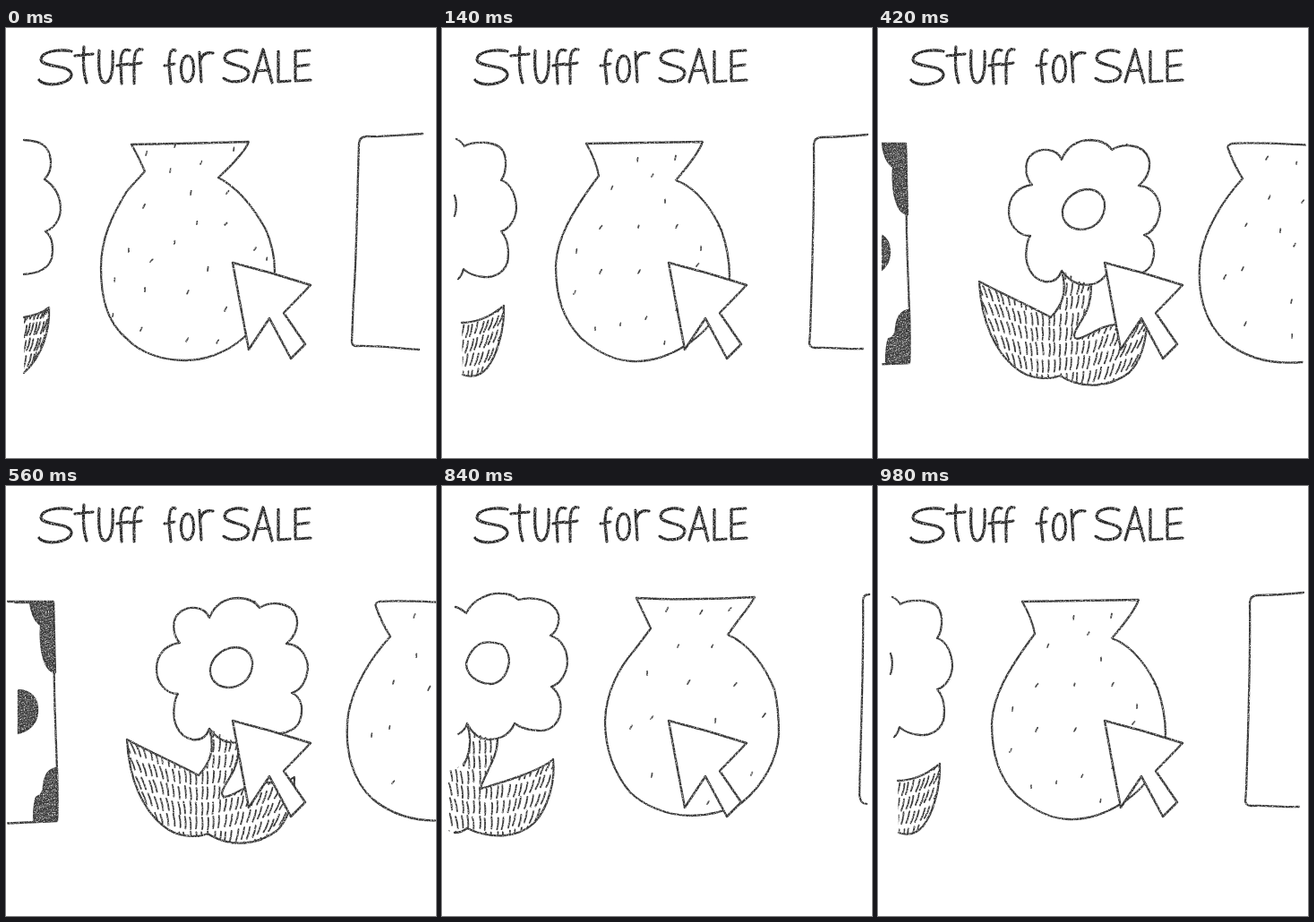
An HTML page that plays this animation: 480 px wide and 480 px high, repeating every 1120 ms.

```html
<!DOCTYPE html>
<html lang="en">
<head>
<meta charset="utf-8">
<title>Stuff for sale</title>
<style>
html, body { margin: 0; width: 100%; height: 100%; overflow: hidden; background: #fff; }
svg { display: block; width: 100vw; height: 100vh; }
path { fill: none; stroke: #383838; stroke-width: 2.3; stroke-linecap: round; stroke-linejoin: round; }
.ink { filter: url(#pencil); }
.title path { stroke: #262626; stroke-width: 3.2; }
.dots { stroke: #444; stroke-width: 1.8; }
.hatch { stroke: #3a3a3a; }
.dark { fill: #555; }
.white { fill: #fff; stroke: none; }
.arrow { stroke-width: 2.5; }
/* the row slides out and back: five poses over eight equal holds */
.pose { opacity: 0; animation: 1120ms step-end infinite; }
.pose0 { animation-name: pose0; }
.pose1 { animation-name: pose1; }
.pose2 { animation-name: pose2; }
.pose3 { animation-name: pose3; }
.pose4 { animation-name: pose4; }
@keyframes pose0 { 0% { opacity: 1 } 12.5%, 100% { opacity: 0 } }
@keyframes pose1 { 0%, 25% { opacity: 0 } 12.5%, 87.5%, 100% { opacity: 1 } }
@keyframes pose2 { 0%, 37.5%, 87.5%, 100% { opacity: 0 } 25%, 75% { opacity: 1 } }
@keyframes pose3 { 0%, 50%, 75%, 100% { opacity: 0 } 37.5%, 62.5% { opacity: 1 } }
@keyframes pose4 { 0%, 62.5%, 100% { opacity: 0 } 50% { opacity: 1 } }
</style>
</head>
<body>
<svg viewBox="0 0 480 480">
  <defs>
    <filter id="pencil" filterUnits="userSpaceOnUse" x="0" y="0" width="480" height="480" color-interpolation-filters="sRGB">
      <feTurbulence type="fractalNoise" baseFrequency=".08" numOctaves="2" result="wobble"/>
      <feDisplacementMap in="SourceGraphic" in2="wobble" scale="1.4" xChannelSelector="R" yChannelSelector="G" result="line"/>
      <feTurbulence type="fractalNoise" baseFrequency=".7" numOctaves="2" seed="4"/>
      <feColorMatrix values="0 0 0 0 0  0 0 0 0 0  0 0 0 0 0  2.4 0 0 0 -.25" result="grain"/>
      <feComposite in="line" in2="grain" operator="in"/>
      <feGaussianBlur stdDeviation=".4"/>
    </filter>
  </defs>

  <g class="title ink" role="img" aria-label="Stuff for SALE">
    <path d="M73 26C60 23 40 26 39 35C40 45 72 40 73 52C72 64 42 66 37 58"/>
    <path d="M87 21C86 35 86 50 90 61M77 31L97 29"/>
    <path d="M104 25C103 45 104 61 111 61C118 60 120 45 119 26"/>
    <path d="M138 25C130 22 128 30 128 40L129 62M124 42L137 40"/>
    <path d="M152 24C144 22 143 32 143 42L143 62M138 41L151 39"/>
    <path d="M189 25C183 22 182 32 182 42L184 62M177 42L188 40"/>
    <path d="M203 31C193 31 193 60 202 60C212 60 212 32 203 31Z"/>
    <path d="M216 27L218 60M217 36Q220 26 231 28"/>
    <path d="M269 27C260 23 245 25 244 34C245 43 271 40 271 51C268 63 247 61 243 56"/>
    <path d="M276 60L287 24L297 61M279 48L294 47"/>
    <path d="M304 26L304 60L317 59"/>
    <path d="M339 25L323 26L323 59L340 58M323 43L338 41"/>
  </g>

  <g id="row"></g>

  <path class="white" d="M253 262L340 287L310 318L334 353L318 369L294 324L271 359Z"/>
  <path class="arrow ink" d="M253 262Q297 273 340 287L310 318L334 353L318 369L294 324L271 359Q262 312 253 262Z"/>
</svg>

<script>
const poses = [
  {
    lines: `M140 130Q205 129 271 127Q266 140 237 167C262 180 279 205 290 225Q300 248 300 272
      C300 300 288 330 266 345C245 364 220 371 200 371C175 371 150 363 135 347C112 328 106 300 106 268
      C106 235 118 210 135 182L155 160Q147 142 140 130
      M20 125C38 126 48 130 50 148Q51 160 43 169C57 178 61 192 61 203C60 215 53 224 44 227
      C52 233 53 245 51 257C47 270 35 274 20 275
      M465 118C445 119 415 122 402 121Q394 122 394 129C392 190 391 270 388 300L386 350Q386 355 391 355
      C415 354 440 358 461 359`,
    leaf: "M20 323Q38 320 48 312C49 335 42 365 20 385",
    hatch: { x: 20, w: 30, cx: -20, gap: 3.6, width: 2 },
    dots: "157,140 189,131 184,159 218,150 255,135 207,184 247,183 154,199 214,217 245,218 189,239 138,248 162,259 226,269 278,246 122,281 156,292 203,295 120,320 245,314 151,336 202,348 236,350 292,257"
  },
  {
    lines: `M161 129Q225 128 291 127Q286 141 261 170C285 178 303 205 312 226Q321 252 321 278
      C318 310 300 335 277 351C255 366 232 373 212 372C190 371 170 359 155 346C135 325 127 300 127 265
      C128 235 145 205 175 165Q172 148 161 129
      M16 124Q20 125 25 132Q32 127 50 128C64 130 70 135 71 148C72 157 69 166 66 170C78 173 83 190 83 202
      C82 215 75 224 66 227C74 236 75 250 73 262C68 275 56 279 47 278Q32 277 24 269Q22 277 18 280
      M14 187Q18 198 14 210
      M475 119C455 121 435 122 423 122Q415 123 415 130C416 190 413 280 411 340L410 352Q411 357 417 357
      C435 356 455 359 470 358`,
    leaf: "M22 329C45 329 60 317 69 310C70 335 62 365 50 380C42 389 32 390 23 387",
    hatch: { x: 21, w: 50, cx: -15, gap: 5.2, width: 1.9 },
    dots: "219,147 261,145 235,164 190,178 250,193 177,222 220,221 262,221 151,249 290,246 177,272 220,272 285,264 148,295 172,335 200,330 228,323 249,351 262,313"
  },
  {
    lines: `M217 125C255 127 310 126 349 124Q345 132 332 148L319 166C345 177 362 205 371 227Q376 248 376 277
      C374 305 360 333 334 354C315 364 298 368 278 368C250 368 225 356 210 342C190 318 182 290 182 262
      C183 230 198 202 215 183L233 159Q225 142 217 125
      M15 135Q20 136 27 142C35 125 55 119 66 120Q78 120 85 127C100 123 125 126 130 144
      C132 155 126 164 121 167C135 171 140 185 140 197C139 210 132 221 122 224C133 232 134 247 131 258
      C126 271 115 274 107 273Q90 272 81 265C75 280 60 285 46 282Q35 279 28 265Q26 273 18 277
      M46 175Q56 173 67 177Q75 184 75 196C73 212 64 221 54 221C38 220 27 210 27 198C30 186 38 177 46 175
      M28 265Q36 290 24 312
      M477 121Q470 121 470 128C471 200 467 290 466 345Q467 355 474 355`,
    leaf: "M62 283C62 305 45 325 43 338C70 330 110 318 124 305C127 330 118 360 103 376C85 393 55 395 28 382Q22 387 14 387",
    cut: "L7 385L7 318Q38 312 28 265Q35 280 62 283",
    hatch: { x: 5, w: 122, cx: 45, gap: 6.2, width: 1.9 },
    dots: "251,138 289,141 321,137 264,178 302,178 230,209 275,219 327,221 211,269 234,258 306,262 359,256 235,323 346,321 297,353"
  },
  {
    clip: [4, 478],
    lines: `M500 131C455 130 420 127 395 129Q389 131 391 135Q397 152 407 168C385 192 365 225 360 255
      C355 295 365 330 388 350C410 368 440 376 474 373
      M205 147C212 130 225 125 238 125Q255 126 261 136C272 129 295 128 302 145C306 160 298 170 291 176
      C308 177 315 192 315 204C313 218 307 228 297 231C309 236 310 250 306 262C300 280 265 280 257 270
      C250 290 222 294 205 271Q200 285 186 283C170 280 163 262 166 245Q167 236 170 232
      C155 232 146 218 146 205C146 187 157 177 172 175C163 165 163 148 172 141C182 133 200 134 205 147
      M235 180C247 181 254 189 253 201C251 216 240 225 226 225C212 224 205 215 206 203C209 189 222 180 235 180
      M-30 129L31 129C32 180 31 220 33 260C34 300 37 340 35 374L-30 377`,
    patches: "M-12 130H31L33 208C22 207 15 185 17 155Q8 150 5 130ZM-8 228Q14 230 13 252Q12 270 -8 276ZM35 315Q22 316 20 335Q20 345 12 347Q9 355 9 374L35 373Z",
    leaf: `M205 271C212 295 205 310 193 323C165 308 135 295 113 283C115 325 130 365 160 384C175 393 195 392 203 388
      C230 405 260 400 280 385C293 373 300 350 300 325Q290 333 270 331C250 330 235 345 222 347
      C215 345 222 335 228 325Q238 310 238 288`,
    hatch: { x: 110, w: 194, cx: 195, gap: 6.2, width: 1.9 },
    dots: "434,145 468,150 437,189 474,193 411,219 450,226 465,242 407,269 387,278 462,305 410,330 463,344"
  }
];
poses.push({ ...poses[3], clip: [1, 480], shift: 22 });

let seed = 7;
const rand = () => (seed = seed * 16807 % 2147483647) / 2147483647;
const spread = n => (rand() - .5) * n;

const flecks = list => list.split(" ").map(p => {
  const [x, y] = p.split(",");
  return `M${x - 1} ${+y + 2}l${1.5 + spread(3)} ${-2.5 - rand() * 2}`;
}).join("");

// Bands of short dashes that sag around cx and fan out from it.
function dashes({ x, w, cx, gap }) {
  let d = "";
  for (let row = 0; row < 11; row++)
    for (let px = x; px < x + w; px += gap) {
      const side = (px - cx) / 95;
      const y = 268 + row * 17 - 25 * side ** 2 + spread(3);
      const lean = 7 * side + spread(1.5);
      d += `M${px + spread(1.5)} ${y + 13}q${lean * .5 + 1} -6 ${lean} -13`;
    }
  return d;
}

function scribble() {
  let d = "";
  for (let y = 125; y < 390; y += 2.6) d += `M-20 ${y + 8}L38 ${y - 8 + spread(5)}`;
  return d;
}

function draw(p, i) {
  const [left, right] = p.clip || [0, 480];
  const patches = p.patches ? `
    <clipPath id="spots${i}"><path d="${p.patches}"/></clipPath>
    <path class="dark" d="${p.patches}"/>
    <path clip-path="url(#spots${i})" d="${scribble()}" style="stroke-width:1.4"/>` : "";
  return `<g class="pose pose${i}">
    <clipPath id="edge${i}"><rect x="${left}" width="${right - left}" height="480"/></clipPath>
    <clipPath id="leaf${i}"><path d="${p.leaf + (p.cut || "")}"/></clipPath>
    <g class="ink"><g clip-path="url(#edge${i})"><g transform="translate(${p.shift || 0})">
      ${patches}
      <path class="hatch" style="stroke-width:${p.hatch.width}" clip-path="url(#leaf${i})" d="${dashes(p.hatch)}"/>
      <path d="${p.leaf}"/>
      <path d="${p.lines}"/>
      <path class="dots" d="${flecks(p.dots)}"/>
    </g></g></g>
  </g>`;
}

document.getElementById("row").innerHTML = poses.map(draw).join("");
</script>
</body>
</html>
```
